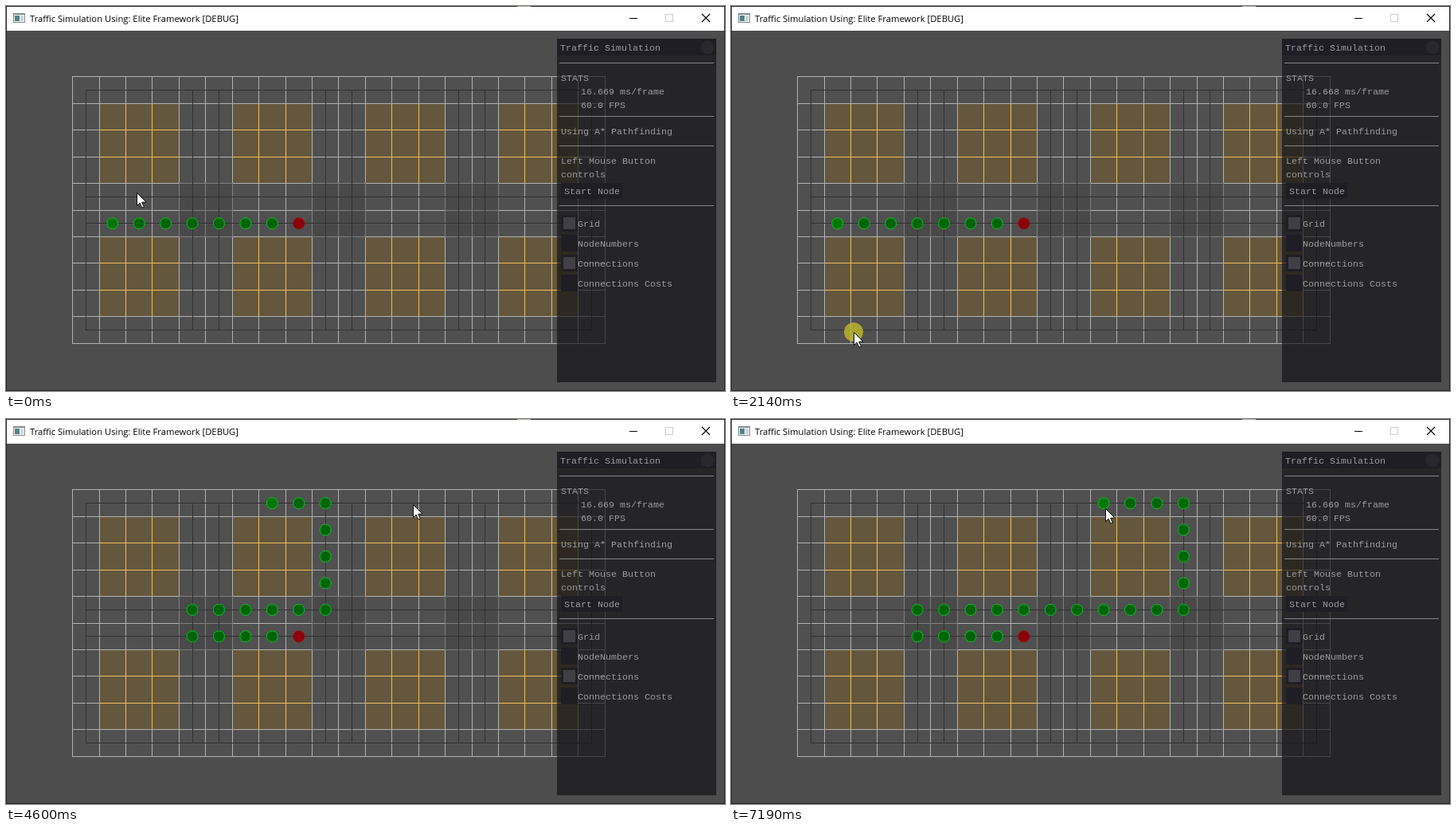
Recreate the animation shown at these times as an HTML page with a canvas. Size 903 by 483 pixels, loop 7260 ms.

```html
<!DOCTYPE html>
<html lang="en">
<head>
<meta charset="utf-8">
<title>Traffic Simulation</title>
<style>
  html, body { margin: 0; width: 100%; height: 100%; overflow: hidden; background: #4d4d4d; }
  canvas { display: block; }
</style>
</head>
<body>
<canvas id="stage" width="903" height="483"></canvas>
<script>
const ctx = document.getElementById('stage').getContext('2d');
const LOOP = 7260, CELL = 33.43, LEFT = 83.6, TOP = 88.9, COLS = 20, ROWS = 10;
const MONO = '11.67px "Liberation Mono", monospace';
const SANS = '11.25px "Open Sans", sans-serif';

const lineX = c => Math.floor(LEFT + CELL * c);
const lineY = r => Math.floor(TOP + CELL * r);
const nodeX = c => LEFT + CELL * (c + 0.5);
const nodeY = r => TOP + CELL * (r + 0.5);

// One-way roads: index -> direction of travel (+1 right or down)
const rowRoads = { 0: 1, 4: -1, 5: 1, 9: -1 };
const colRoads = { 0: -1, 4: 1, 5: -1, 9: 1, 10: -1, 14: 1, 15: -1, 19: 1 };
const GOAL = [8, 5];

// Shortest route along the one-way roads
function findRoute(start) {
  const queue = [[start]], seen = new Set([String(start)]);
  while (queue.length) {
    const route = queue.shift(), [c, r] = route[route.length - 1];
    if (c === GOAL[0] && r === GOAL[1]) return route;
    for (const next of [[c + (rowRoads[r] || 0), r], [c, r + (colRoads[c] || 0)]]) {
      const inside = next[0] >= 0 && next[0] < COLS && next[1] >= 0 && next[1] < ROWS;
      if (!inside || seen.has(String(next))) continue;
      seen.add(String(next));
      queue.push([...route, next]);
    }
  }
  return [start];
}

// Pointer stops; a click sets the start node under the pointer
const stops = [
  { t: 0, x: 164, y: 234 },
  { t: 560, x: 157, y: 237, click: true },
  { t: 1330, x: 140, y: 272, click: true },
  { t: 2210, x: 154, y: 409, click: true },
  { t: 3050, x: 184, y: 104, click: true },
  { t: 3900, x: 332, y: 108, click: true },
  { t: 4810, x: 516, y: 107, click: true },
  { t: 5860, x: 407, y: 112 },
  { t: 6980, x: 470, y: 112, click: true }
];
const clicks = stops.filter(s => s.click);
for (const s of clicks) {
  s.route = findRoute([Math.floor((s.x - LEFT) / CELL), Math.floor((s.y - TOP) / CELL)]);
}
const firstRoute = findRoute([1, 5]);
const REST = 150, PRESS = 140;

function pointerAt(t) {
  const i = stops.filter(s => s.t <= t).length - 1;
  const a = stops[i], b = stops[i + 1] || a;
  const span = b.t - a.t - 2 * REST;
  const p = Math.min(1, Math.max(0, (t - a.t - REST) / span)), e = p * p * (3 - 2 * p);
  return [Math.round(a.x + (b.x - a.x) * e), Math.round(a.y + (b.y - a.y) * e)];
}

function box(x, y, w, h, color) {
  ctx.fillStyle = color;
  ctx.fillRect(x, y, w, h);
}

function frame(x, y, w, h, color) {
  ctx.strokeStyle = color;
  ctx.lineWidth = 1;
  ctx.strokeRect(x + 0.5, y + 0.5, w - 1, h - 1);
}

function text(str, x, y, color, font) {
  ctx.font = font;
  ctx.fillStyle = color;
  ctx.fillText(str, x, y);
}

function disc(x, y, r, fill, stroke) {
  ctx.beginPath();
  ctx.arc(x, y, r, 0, 2 * Math.PI);
  ctx.fillStyle = fill;
  ctx.fill();
  if (stroke) {
    ctx.strokeStyle = stroke;
    ctx.lineWidth = 1;
    ctx.stroke();
  }
}

function cells(c, r, cols, rows, color) {
  const x = lineX(c), y = lineY(r);
  box(x, y, lineX(c + cols) - x + 1, lineY(r + rows) - y + 1, color);
}

function drawBlock(c, r) {
  const x = lineX(c) + 1, y = lineY(r) + 1;
  const w = lineX(c + 3) - x, h = lineY(r + 3) - y;
  box(x, y, w, h, '#64573d');
  for (const i of [1, 2]) {
    box(lineX(c + i), y, 1, h, '#efbd5c');
    box(x, lineY(r + i), w, 1, '#efbd5c');
  }
}

function drawMap() {
  cells(0, 0, COLS, ROWS, '#505050');
  for (let c = 0; c <= COLS; c++) box(lineX(c), lineY(0), 1, lineY(ROWS) - lineY(0) + 1, '#b2b2b2');
  for (let r = 0; r <= ROWS; r++) box(lineX(0), lineY(r), lineX(COLS) - lineX(0) + 1, 1, '#b2b2b2');
  for (let c = 1; c < COLS; c += 5) {
    drawBlock(c, 1);
    drawBlock(c, 6);
    if (c + 5 < COLS) cells(c + 3, 4, 2, 2, 'rgba(64,64,64,0.45)');
  }
  const x = Math.floor(nodeX(0)), y = Math.floor(nodeY(0));
  const w = Math.floor(nodeX(COLS - 1)) - x + 1, h = Math.floor(nodeY(ROWS - 1)) - y + 1;
  for (const r in rowRoads) box(x, Math.floor(nodeY(+r)), w, 1, '#313131');
  for (const c in colRoads) box(Math.floor(nodeX(+c)), y, 1, h, '#313131');
}

function drawRoute(t) {
  const done = clicks.filter(s => s.t <= t).pop();
  const route = done ? done.route : firstRoute;
  route.forEach(([c, r], i) => {
    const x = nodeX(c), y = nodeY(r);
    if (i === route.length - 1) disc(x, y, 7, '#8c0008', '#940a10');
    else disc(x, y, 7, i ? '#00640a' : '#007808', '#00c81e');
  });
}

function drawPanel(t) {
  const dark = '#1f1e24', ink = '#9c9c9e';
  const label = (str, x, mid) => text(str, x, mid + 4, ink, MONO);
  const digit = Math.round(7.3 + 1.5 * Math.cos(6 * Math.PI * t / LOOP));
  box(692, 41, 200, 431, 'rgba(17,17,20,0.66)');
  box(692, 41, 200, 21, dark);
  disc(881, 52, 8.5, '#29282d');
  label('Traffic Simulation', 696, 52);
  for (const y of [71, 138, 175, 250]) box(695, y, 194, 1, '#858585');
  label('STATS', 697, 90);
  label('16.66' + digit + ' ms/frame', 722, 107);
  label('60.0 FPS', 722, 124);
  label('Using A* Pathfinding', 697, 157);
  label('Left Mouse Button', 697, 194);
  label('controls', 697, 211);
  box(697, 222, 77, 20, dark);
  label('Start Node', 701, 232);
  ['Grid', 'NodeNumbers', 'Connections', 'Connections Costs'].forEach((name, i) => {
    const y = 273 + 25 * i;
    box(697, y - 11, 21, 21, dark);
    if (i % 2 === 0) box(700, y - 8, 15, 15, '#403f46');
    label(name, 718, y);
  });
}

function drawWindow() {
  box(0, 0, 903, 31, '#ffffff');
  frame(0, 0, 903, 483, '#262626');
  box(642, 0, 17, 1, '#a8a698');

  box(9, 9, 15, 12, '#858b8f');
  box(10, 11, 13, 9, '#f4f4f4');
  box(11, 12, 6, 7, '#52808a');
  box(18, 12, 4, 7, '#d0d4d6');

  text('Traffic Simulation Using: Elite Framework [DEBUG]', 30, 20, '#000000', SANS);

  box(783, 15, 10, 1, '#000000');
  frame(828, 10, 10, 10, '#cccccc');
  ctx.strokeStyle = '#000000';
  ctx.lineWidth = 1.1;
  ctx.beginPath();
  ctx.moveTo(874, 10);
  ctx.lineTo(884, 20);
  ctx.moveTo(884, 10);
  ctx.lineTo(874, 20);
  ctx.stroke();
}

function drawPointer(t) {
  const [x, y] = pointerAt(t);
  const pressed = clicks.some(s => t >= s.t - PRESS && t < s.t);
  if (pressed) disc(x, y, 12, 'rgba(196,188,42,0.78)');
  ctx.save();
  ctx.translate(x + 0.5, y + 0.5);
  ctx.beginPath();
  ctx.moveTo(0, 0);
  for (const [px, py] of [[0, 16], [3.7, 12.7], [6.3, 18.7], [8.8, 17.6], [6.2, 11.7], [11.5, 11.5]]) {
    ctx.lineTo(px, py);
  }
  ctx.closePath();
  ctx.fillStyle = '#ffffff';
  ctx.fill();
  ctx.strokeStyle = '#111111';
  ctx.lineWidth = 1;
  ctx.stroke();
  ctx.restore();
}

function draw(t) {
  box(0, 0, 903, 483, '#4d4d4d');
  drawMap();
  drawRoute(t);
  drawPanel(t);
  drawWindow();
  drawPointer(t);
}

const start = performance.now();
function tick() {
  draw((performance.now() - start) % LOOP);
  requestAnimationFrame(tick);
}
tick();
</script>
</body>
</html>
```
